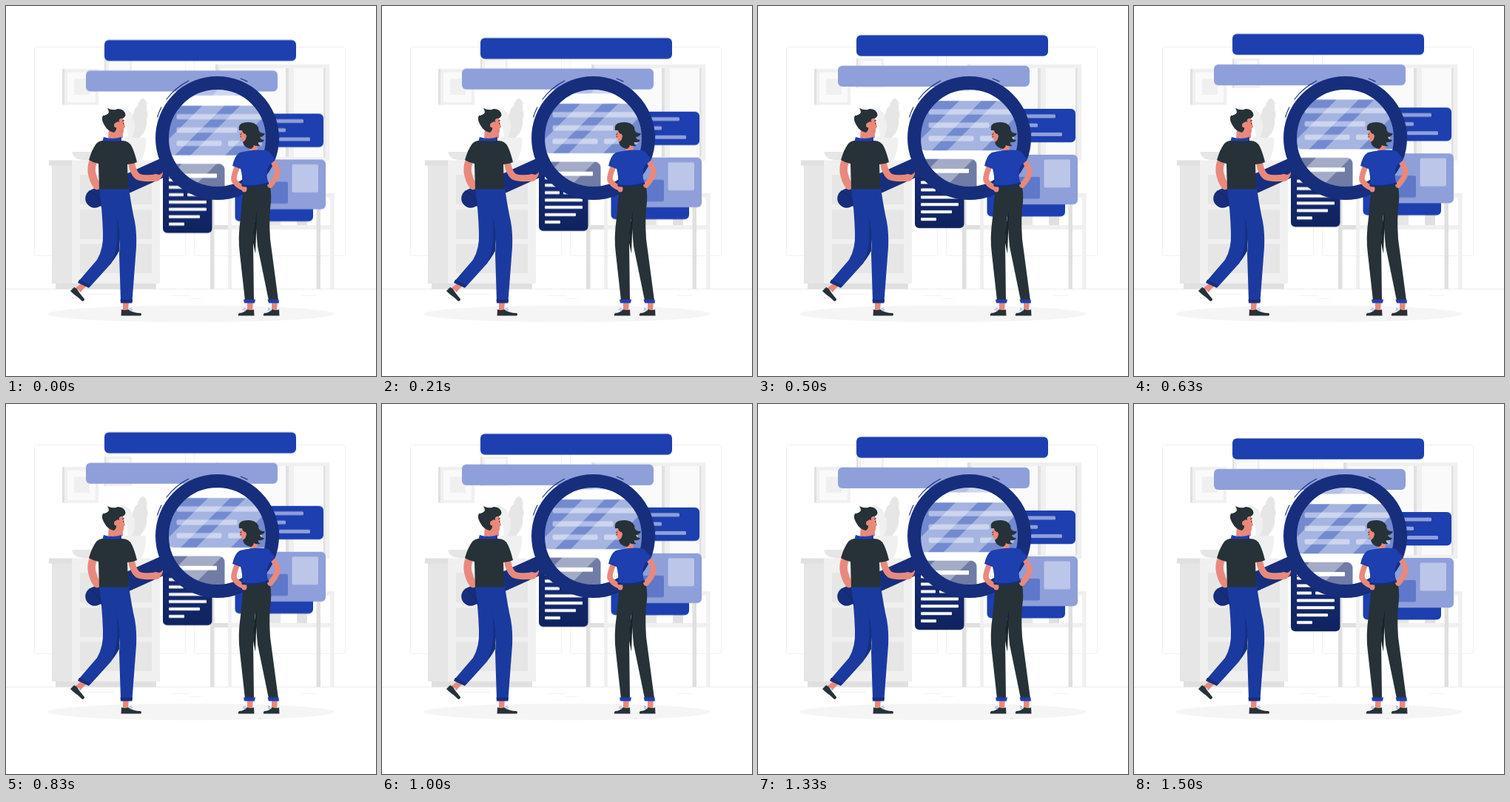
Animation, 500 px wide and 500 px high, one loop 1540 ms. Source, as an HTML page:

```html
<!DOCTYPE html>
<html lang="en">
<head>
<meta charset="utf-8">
<title>Search illustration</title>
<style>
  html, body { margin: 0; width: 100%; height: 100%; overflow: hidden; background: #fff; }
  svg { display: block; width: 100vw; height: 100vh; }

  .g0 { fill: #e0e0e0; }
  .g1 { fill: #e6e6e6; }
  .g2 { fill: #f0f0f0; }
  .g3 { fill: #fafafa; }
  .blue { fill: #1d3faf; }
  .soft { fill: #8f9fd9; }
  .pale { fill: #bcc6e8; }
  .navy { fill: #172e7c; }
  .dark { fill: #263238; }
  .skin { fill: #e8897c; }
  .white { fill: #fff; }
  .pants { fill: #1b3a9f; }
  .limb { fill: none; stroke: #e8897c; stroke-linecap: round; stroke-linejoin: round; }
  .ink { fill: none; stroke: #172e7c; }
  .thin { fill: none; stroke: #f0f0f0; }

  /* 37 held poses per loop: 18 steps up, 19 down */
  .float { animation: float 1540ms -45ms infinite; }
  @keyframes float {
    0% { transform: translateY(0); animation-timing-function: steps(18, end); }
    48.649% { transform: translateY(-9.85px); animation-timing-function: steps(19, end); }
    100% { transform: translateY(0); }
  }
</style>
</head>
<body>
<svg viewBox="0 0 500 500">
  <defs>
    <clipPath id="lens"><circle cx="285.5" cy="178.5" r="66"/></clipPath>
    <linearGradient id="sheet" x1="0" y1="0" x2="0" y2="1">
      <stop offset="0" stop-color="#172e7c"/>
      <stop offset="1" stop-color="#10235f"/>
    </linearGradient>
  </defs>

  <!-- room -->
  <g class="thin">
    <rect x="38.5" y="55.5" width="204" height="282" rx="3"/>
    <rect x="254.5" y="55.5" width="204" height="282" rx="3"/>
    <path d="M0 382.5H500" stroke="#ebebeb"/>
    <path d="M104 389.5H145M223 391.5H248M249 395.5H264M400 391.5H419"/>
  </g>
  <ellipse cx="250" cy="416" rx="194" ry="11.3" fill="#f5f5f5"/>

  <!-- pictures -->
  <rect class="g0" x="76" y="85" width="8" height="48.5"/>
  <rect class="g2" x="79" y="85" width="46" height="48.5"/>
  <rect class="g3" x="83" y="89.500" width="38" height="40.500"/>
  <rect class="g2" x="92" y="98.500" width="21" height="21.500"/>
  <rect class="g0" x="133" y="71" width="4" height="40"/>
  <rect class="g2" x="135" y="71" width="35" height="40"/>
  <rect class="g3" x="139" y="74" width="28" height="34"/>

  <!-- window -->
  <rect class="g2" x="283" y="79" width="154.500" height="130"/>
  <rect class="g0" x="283" y="79" width="4" height="130"/>
  <rect class="g3" x="290" y="84" width="88" height="120"/>
  <rect class="g0" x="378" y="84" width="4" height="120"/>
  <rect class="g3" x="389" y="84" width="41" height="120"/>
  <rect class="g0" x="429" y="84" width="2.500" height="120"/>

  <!-- cabinet -->
  <rect class="g0" x="67" y="374" width="136" height="8.500"/>
  <rect class="g1" x="62" y="214" width="28" height="161"/>
  <rect class="g2" x="89" y="214" width="119" height="161"/>
  <rect class="g0" x="58" y="208.500" width="33" height="7"/>
  <rect class="g2" x="89" y="208.500" width="121" height="7"/>
  <g class="g1">
    <rect x="100" y="228" width="97" height="40"/>
    <rect x="100" y="275.500" width="97" height="39.500"/>
    <rect x="100" y="321.500" width="97" height="39.500"/>
  </g>
  <path class="g1" d="M89 197H133V208.500H108Q91 208 89 197Z"/>
  <path class="g2" d="M154 136Q170 138 176 158L179 178H165Q162 150 154 136Z"/>
  <path class="g1" d="M185 124.500Q192 128 190 140Q193 146 190 154Q192 166 181 178H170Q178 160 171 151Q172 139 178 135Q179 128 185 124.500Z"/>
  <path class="g2" d="M160 178H189Q190 195 183 208.500H166Q159 195 160 178Z"/>

  <!-- desk -->
  <rect class="g2" x="300" y="253" width="5" height="129.500"/>
  <rect class="g2" x="276" y="253" width="167.500" height="6"/>
  <rect class="g2" x="438" y="253" width="5.500" height="129.500"/>
  <rect class="g2" x="276" y="296" width="167" height="6"/>
  <rect class="g0" x="276" y="296" width="24" height="6"/>
  <rect class="g0" x="276" y="253" width="5.500" height="129.500"/>
  <rect class="g0" x="419.500" y="253" width="5.500" height="129.500"/>
  <rect class="g1" x="350" y="262" width="21" height="34"/>
  <rect class="g0" x="393" y="262" width="14" height="34"/>

  <!-- floating panels -->
  <g class="float">
    <rect class="blue" x="133" y="46.500" width="259" height="28.200" rx="6"/>
    <rect class="soft" x="108" y="87.800" width="259" height="28.200" rx="6"/>
    <rect class="blue" x="320" y="146" width="109" height="45.300" rx="6"/>
    <g class="soft">
      <rect x="340" y="153.500" width="62" height="5" rx="1.500"/>
      <rect x="340" y="165.700" width="38" height="5" rx="1.500"/>
      <rect x="369" y="178" width="42" height="5" rx="1.500"/>
    </g>
    <rect class="blue" x="309.500" y="225" width="105.500" height="66.500" rx="6"/>
    <rect class="soft" x="328" y="208" width="104" height="67.200" rx="6"/>
    <rect x="346" y="238" width="35" height="29.500" rx="2" fill="#5f78c9"/>
    <rect class="pale" x="386.500" y="214.500" width="35.500" height="38" rx="2"/>
    <rect x="212" y="213.500" width="66.500" height="93.700" rx="6" fill="url(#sheet)"/>
    <g class="white">
      <rect x="220" y="227" width="50" height="5.500" rx="1"/>
      <rect x="220" y="233.500" width="50" height="4" rx="1"/>
      <rect x="220" y="243.500" width="51" height="4" rx="1"/>
      <rect x="220" y="253.400" width="20" height="4" rx="1"/>
      <rect x="245" y="253.400" width="26" height="4" rx="1"/>
      <rect x="220" y="263.400" width="51" height="4" rx="1"/>
      <rect x="220" y="273.300" width="51" height="4" rx="1"/>
      <rect x="220" y="283.300" width="42" height="4" rx="1"/>
      <rect x="220" y="293.200" width="21" height="4" rx="1"/>
    </g>
  </g>

  <!-- magnifier -->
  <path class="ink" d="M120 260L224 213" stroke-width="25.500" stroke-linecap="round"/>
  <path d="M112 250Q125 254 129 271" fill="none" stroke="#122566"/>
  <g clip-path="url(#lens)">
    <rect class="white" x="215" y="110" width="140" height="140"/>
    <g class="float">
      <rect x="200" y="80" width="170" height="41.500" fill="#b5c0e6"/>
      <rect x="220" y="135.300" width="150" height="67" rx="6" fill="#738acf"/>
      <g fill="#b1bee7">
        <rect x="230.500" y="146.500" width="116" height="7.200" rx="2"/>
        <rect x="230.500" y="164.500" width="82" height="7.200" rx="2"/>
        <rect x="230.500" y="182.500" width="61" height="7.200" rx="2"/>
        <rect x="300" y="182.500" width="46" height="7.200" rx="2"/>
      </g>
      <rect x="200" y="213.700" width="95.500" height="90" rx="8" fill="#707ca6"/>
      <rect class="white" x="214" y="227" width="71" height="5.800" rx="1"/>
    </g>
    <g class="white" opacity=".36">
      <path d="M290 110H320L180 250H150Z"/>
      <path d="M341 110H388L248 250H201Z"/>
    </g>
  </g>
  <circle class="ink" cx="285.500" cy="178.500" r="74.500" stroke-width="18"/>
  <path class="ink" stroke-width="1.100" d="M204.500 150.500A86.500 86.500 0 0 1 210 136.500M216.500 126.500A86.500 86.500 0 0 1 247 101M317 98A86.500 86.500 0 0 1 326.500 102.300"/>

  <!-- man -->
  <path class="limb" d="M118 209Q114 219 116.500 228Q118 236 123 243" stroke-width="10.500"/>
  <path class="skin" d="M104 373L109 378L101 386L94 381Z"/>
  <path class="dark" d="M92 380Q97 382 98 386L106 396Q106 399 103 399Q97 393 91 389L87 385Z"/>
  <path class="pants" d="M126 246H156L154 315Q153 332 142 348L113 380L98 372L123 343Q132 328 131 306Q130 275 126 246Z"/>
  <path class="navy" d="M99 370L114 377L112 381L97 374Z"/>
  <path class="skin" d="M158 400H166L165 411H158Z"/>
  <path class="dark" d="M156 410Q161 412 165 410Q172 415 182 415Q184 417 182 418.500H155.500Z"/>
  <path class="pants" d="M140 246H166Q170 274 174 291Q177 308 176 326L170.500 399H155L153 335Q156 305 149 281Z"/>
  <path d="M149 281Q155 307 153 331Q147 342 142 347Q154 326 149 281Z" fill="#15307f"/>
  <path class="navy" d="M154.500 396.500H171L170.500 401.500H155Z"/>
  <path d="M166 410L170 408M167 412L171 410M98 386L102 386" fill="none" stroke="#8f9fd9"/>
  <path class="skin" d="M139 165L151 160L158 172V178Q147 183 138 178Z"/>
  <path class="skin" d="M149 151H158Q160 158 161 164Q160 165 159 165Q160 172 156 173Q147 175 142 166Z"/>
  <path class="dark" d="M137 138Q145 142 151 139Q160 139 161.500 147Q161 152 155 152Q152 153 153 157Q148 154 149 162Q150 168 146 171Q137 169 133 161Q128 153 131 148Q136 148 139 144Q139 141 137 138Z"/>
  <circle class="skin" cx="149.500" cy="161" r="3.500"/>
  <path d="M157 155.500L160 154.500M158.500 158V159.500" fill="none" stroke="#263238"/>
  <path class="blue" d="M132 177Q144 181 156 177V184H130Z"/>
  <path class="limb" d="M169 209Q171 225 178 230.500Q186 234 204 232" stroke-width="9"/>
  <path class="skin" d="M193 229L203 227Q208 230 212 224Q212 232 206 235Q202 239 194 236Z"/>
  <path class="dark" d="M131 182Q144 183 157 182Q166 182 170 190Q174 198 177 211Q171 214 164 214L165 247.500H126L125 213Q118 212 112 208Q116 194 122 186Q126 182 131 182Z"/>

  <!-- woman -->
  <path class="skin" d="M326 399H334L333 411H326ZM359 399H367L366 411H359Z"/>
  <path id="shoe" class="dark" d="M335 410Q331 412 326 410Q321 415 315 415Q313 417 314 418.500H335.500Z"/>
  <use href="#shoe" transform="translate(34)"/>
  <path d="M325 410L321 408M324 412L320 410M358 410L354 408M357 412L354 410" fill="none" stroke="#8f9fd9"/>
  <path class="dark" d="M321 243L356 240Q359 252 358 265Q355 285 357 315L368 398H355L340 325Q338 305 337 281L334 320L335 398H323L316 335Q313 313 317 286Z"/>
  <path d="M339 278Q334 295 334 320L337 335Z" fill="#1a2328"/>
  <path class="blue" d="M321 396.500H337L336 401.500H322ZM353.500 396.500H368.500L369 401.500H355Z"/>
  <path class="skin" d="M331 185H339L340 196Q335 200 329 196Z"/>
  <path class="limb" d="M361 210Q368 222 367 227Q363 236 357 242" stroke-width="7.500"/>
  <path class="limb" d="M313 216Q307 230 308 235Q311 242 321 246" stroke-width="7.500"/>
  <ellipse class="skin" cx="322" cy="247" rx="3.500" ry="4.500"/>
  <path class="blue" d="M316 198Q335 193 352 195Q357 197 364 208L355 216Q350 228 355 240Q338 246 319 242Q320 230 317 220L306 216Q309 202 316 198Z"/>
  <path class="navy" d="M318 241Q338 244 355 238V241Q338 246 319 244Z"/>
  <path class="skin" d="M318 167H333L335 185Q326 189 320 184L318 179Q316 179 315.500 177Z"/>
  <path class="dark" d="M315 168Q313 159 322 157.500Q336 155 341 164Q341 173 350 172Q348 177 343 177Q344 181 349 181Q347 185 341 184Q340 187 344 189Q338 190 335 188Q334 192 331 193Q322 192 320 184Q326 181 324 173Q320 173 319 168Z"/>
  <circle class="skin" cx="322" cy="176" r="2.800"/>
  <path d="M316 173.500L318.500 173M317.500 175.500V177" fill="none" stroke="#263238" stroke-width=".9"/>
</svg>
</body>
</html>
```
